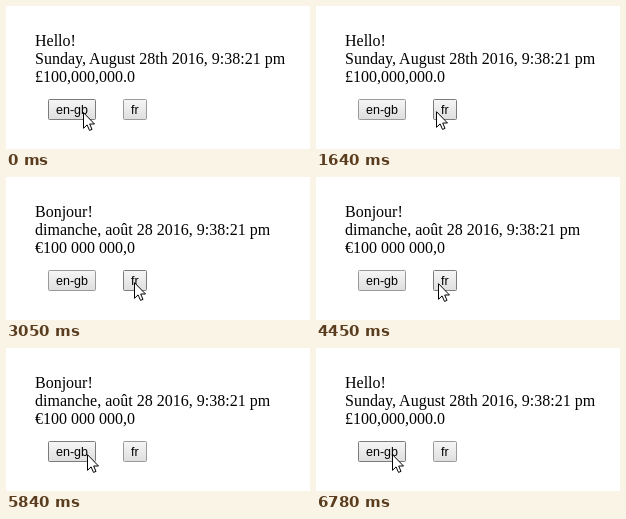
These frames come from a looping animation (304x143 px, 6860 ms). An HTML page:

```html
<!DOCTYPE html>
<html lang="en">
<head>
<meta charset="utf-8">
<title>Locale switch</title>
<style>
html, body { margin: 0; width: 100%; height: 100%; overflow: hidden; background: #fff; }
svg { display: block; }
.copy { font: 16px "Liberation Serif", serif; }
.label { font: 12.5px "Liberation Sans", sans-serif; }
</style>
</head>
<body>
<svg width="304" height="143" viewBox="0 0 304 143">
  <defs>
    <linearGradient id="up" x2="0" y2="1"><stop stop-color="#f6f6f6"/><stop offset="1" stop-color="#dedede"/></linearGradient>
    <linearGradient id="down" x2="0" y2="1"><stop stop-color="#dedede"/><stop offset="1" stop-color="#f6f6f6"/></linearGradient>
  </defs>
  <g class="copy">
    <text x="29" y="40"></text>
    <text x="29" y="58"></text>
    <text x="29" y="76"></text>
  </g>
  <g class="label">
    <rect id="en" x="42.5" y="93.5" width="47" height="20" rx="1"/>
    <text x="50" y="108">en-gb</text>
    <rect id="fr" x="117.5" y="93.5" width="23" height="20" rx="1"/>
    <text x="125" y="108">fr</text>
  </g>
  <path id="cursor" d="M.5 .7V16.3L4.1 12.9L6.5 18.4L9 17.4L6.7 12H11.5Z" fill="#fff" stroke="#000"/>
</svg>
<script>
const LOOP = 6860;
const STEP = 78; // the pointer advances in small jumps
const COPY = {
  en: ["Hello!", "Sunday, August 28th 2016, 9:38:21 pm", "£100,000,000.0"],
  fr: ["Bonjour!", "dimanche, août 28 2016, 9:38:21 pm", "€100 000 000,0"]
};
// time and pointer x
const PATH = [
  [0, 77], [700, 77], [1020, 91], [1410, 117], [2030, 126], [2350, 128],
  [4370, 128], [4520, 116], [4600, 116], [5300, 89], [5620, 83],
  [6150, 76], [LOOP, 76]
];
const $ = id => document.getElementById(id);
const lines = document.querySelectorAll(".copy text");
const between = (v, a, b) => v >= a && v < b;

function cursorX(t) {
  const i = PATH.findIndex(([time]) => time > t);
  const [t0, x0] = PATH[i - 1];
  const [t1, x1] = PATH[i];
  const passed = Math.floor((t - t0 + 4) / STEP) * STEP;
  return Math.round(x0 + (x1 - x0) * Math.min(1, passed / (t1 - t0)));
}

function paint(button, over, pressed) {
  button.setAttribute("fill", `url(#${pressed ? "down" : "up"})`);
  button.setAttribute("stroke", over ? "#7b7b7b" : "#9a9a9a");
}

function draw(t) {
  const x = cursorX(t);
  const y = between(t, 1490, 4450) ? 105 : 106;
  const copy = COPY[between(t, 3050, 6780) ? "fr" : "en"];
  lines.forEach((line, i) => {
    if (line.textContent !== copy[i]) line.textContent = copy[i];
  });
  paint($("en"), x < 92, between(t, 6700, 6780));
  paint($("fr"), between(x, 118, 141), between(t, 2900, 3050));
  $("cursor").setAttribute("transform", `translate(${x} ${y})`);
}

const start = performance.now();
function tick() {
  draw((performance.now() - start) % LOOP);
  requestAnimationFrame(tick);
}
draw(0);
requestAnimationFrame(tick);
</script>
</body>
</html>
```
